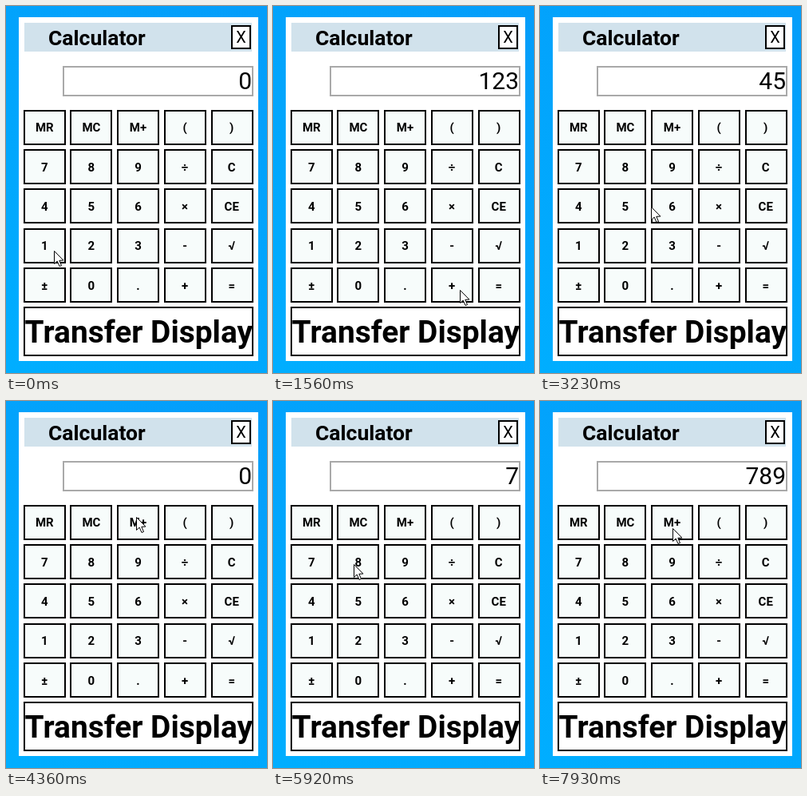
An HTML page with a canvas for the animation above (8 s loop, 327x459 px).

```html
<!DOCTYPE html>
<html lang="en">
<head>
<meta charset="utf-8">
<title>Calculator</title>
<style>
html, body { margin: 0; width: 100%; height: 100%; overflow: hidden; background: #04a0fa; }
canvas { display: block; width: 327px; height: 459px; }
</style>
</head>
<body>
<canvas id="stage"></canvas>
<script>
const W = 327, H = 459, LOOP = 8000;
const canvas = document.getElementById('stage');
const ctx = canvas.getContext('2d');
const dpr = window.devicePixelRatio || 1;
canvas.width = W * dpr;
canvas.height = H * dpr;
ctx.scale(dpr, dpr);

const ROWS = [
  ['MR', 'MC', 'M+', '(', ')'],
  ['7', '8', '9', '÷', 'C'],
  ['4', '5', '6', '×', 'CE'],
  ['1', '2', '3', '-', '√'],
  ['±', '0', '.', '+', '=']
];
const KEY_W = 53, KEY_H = 44;
const keyX = c => Math.floor(22 + c * 58.75);
const keyY = r => Math.floor(130.25 + r * 49.25);

// The picture moves in steps, grouped in bursts with pauses between them
const STEP = 153;
const BURSTS = [
  [130, 1050], [1220, 2180], [2480, 3400], [3570, 4360],
  [5030, 5920], [6220, 6530], [6860, 7800], [7930, 7930]
];

// Clicks: step, pointer x, y; the key is whatever lies under the pointer
const CLICKS = [
  [1, 60, 306], [4, 110, 306], [8, 150, 306], [11, 234, 355],
  [15, 64, 249], [18, 120, 251], [22, 158, 251], [26, 163, 145],
  [31, 63, 201], [35, 101, 204], [40, 150, 203], [46, 166, 159]
];

function stepAt(t) {
  let step = 0;
  for (const [from, to] of BURSTS) {
    if (t < from) break;
    const gaps = Math.round((to - from) / STEP);
    const done = gaps ? (t - from) / (to - from) * gaps : 0;
    step += 1 + Math.min(gaps, Math.floor(done + 0.15));
  }
  return step;
}

// Rests one step on each side of a click, then goes straight to the next key
function pointerAt(step) {
  const next = CLICKS.findIndex(c => c[0] > step);
  const [s1, x1, y1] = CLICKS[next];
  if (next === 0) return [x1, y1];
  const [s0, x0, y0] = CLICKS[next - 1];
  const k = Math.max(0, Math.min(1, (step - s0 - 1) / (s1 - s0 - 2)));
  return [Math.round(x0 + (x1 - x0) * k), Math.round(y0 + (y1 - y0) * k)];
}

function keyAt(x, y) {
  const c = [0, 1, 2, 3, 4].find(i => x >= keyX(i) && x < keyX(i) + KEY_W);
  const r = [0, 1, 2, 3, 4].find(i => y >= keyY(i) && y < keyY(i) + KEY_H);
  return ROWS[r][c];
}

function displayAt(step) {
  let shown = '0', fresh = true;
  for (const [s, x, y] of CLICKS) {
    if (s > step) break;
    const key = keyAt(x, y);
    const digit = key >= '0' && key <= '9';
    if (digit) shown = fresh ? key : shown + key;
    else if (key === 'M+') shown = '0';
    fresh = !digit;
  }
  return shown;
}

function box(x, y, w, h, fill, line) {
  ctx.fillStyle = line;
  ctx.fillRect(x, y, w, h);
  ctx.fillStyle = fill;
  ctx.fillRect(x + 2, y + 2, w - 4, h - 4);
}

function text(str, x, y, font, align) {
  ctx.font = font + ' Roboto, "Liberation Sans", sans-serif';
  ctx.textAlign = align;
  ctx.fillStyle = '#000';
  ctx.fillText(str, x, y);
}

function drawKeys(pressed) {
  ROWS.forEach((row, r) => row.forEach((key, c) => {
    box(keyX(c), keyY(r), KEY_W, KEY_H, key === pressed ? '#2e9cc3' : '#f7fcfb', '#000');
    text(key, 48.3 + c * 58.6, Math.round(157.2 + r * 49.4), 'bold 15px', 'center');
  }));
}

function drawPointer(x, y) {
  ctx.save();
  ctx.translate(x + 0.5, y + 0.5);
  ctx.beginPath();
  [[0, 0], [0, 16], [3.7, 12.6], [6.5, 19], [9, 18], [6.3, 11.8], [11.4, 11.6]]
    .forEach(([px, py]) => ctx.lineTo(px, py));
  ctx.closePath();
  ctx.fillStyle = '#fff';
  ctx.fill();
  ctx.lineWidth = 1;
  ctx.strokeStyle = '#000';
  ctx.stroke();
  ctx.restore();
}

function draw(time) {
  const step = stepAt(time);
  const [x, y] = pointerAt(step);
  const down = CLICKS.some(c => c[0] === step);

  const sky = ctx.createLinearGradient(W, 0, 0, H);
  sky.addColorStop(0, '#049dfa');
  sky.addColorStop(1, '#00aeff');
  ctx.fillStyle = sky;
  ctx.fillRect(0, 0, W, H);
  ctx.fillStyle = '#fff';
  ctx.fillRect(16, 14, 300, 430);
  ctx.fillStyle = '#d1e2ec';
  ctx.fillRect(23, 21, 285, 36);
  text('Calculator', 53, 49, 'bold 26.5px', 'left');
  box(282, 24, 25, 30, '#fff', '#000');
  text('X', 294.5, 46, '20px', 'center');
  box(71, 75, 239, 38, '#fff', '#a9a9a9');
  text(displayAt(step), 308, 104, '30px', 'right');

  drawKeys(down ? keyAt(x, y) : '');
  box(22, 376, 288, 62, '#fff', '#000');
  text('Transfer Display', 166.3, 421, 'bold 38.9px', 'center');

  if (down) {
    ctx.fillStyle = 'rgba(255, 240, 0, 0.5)';
    ctx.beginPath();
    ctx.arc(x - 0.5, y - 0.5, 12, 0, Math.PI * 2);
    ctx.fill();
  }
  drawPointer(x, y);
}

const start = performance.now();
function tick() {
  draw((performance.now() - start) % LOOP);
  requestAnimationFrame(tick);
}
draw(0);
requestAnimationFrame(tick);
</script>
</body>
</html>
```
